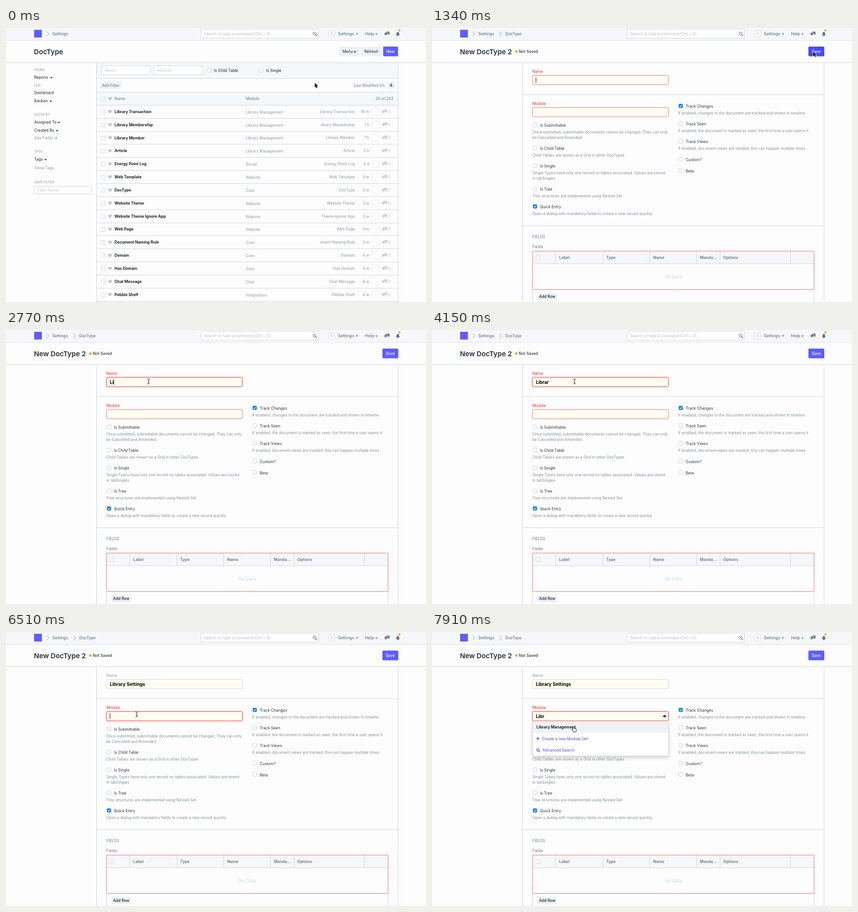
An HTML page with a canvas for the animation above (8000 ms loop, 925 by 605 pixels).

```html
<!DOCTYPE html>
<html lang="en">
<head>
<meta charset="utf-8">
<title>New DocType</title>
<style>
html, body { margin: 0; width: 100%; height: 100%; overflow: hidden; background: #fdfdfd; }
canvas { display: block; width: 925px; height: 605px; }
</style>
</head>
<body>
<canvas id="stage"></canvas>
<script>
const W = 925, H = 605, LOOP = 8000;
const canvas = document.getElementById('stage');
const ratio = window.devicePixelRatio || 1;
canvas.width = W * ratio;
canvas.height = H * ratio;
const ctx = canvas.getContext('2d');

const DARK = '#2d363f', INK = '#1b232b', MUTED = '#8d99a6', NAV = '#6c7680', FAINT = '#c3cad1',
  LINE = '#ced4d9', PANEL = '#f5f7fa', PAGE = '#fdfdfd', BUTTON = '#edf1f4', BLUE = '#5e5eff',
  HOVER = '#3434ff', PRESSED = '#2a1cff', RED = '#ff1f2b', CREAM = '#fffdf1';

// y is the middle of the capital letters
function text(str, x, y, { color = DARK, size = 8.45, weight = 400, align = 'left' } = {}) {
  ctx.font = `${weight} ${size}px Inter, sans-serif`;
  ctx.textAlign = align;
  ctx.fillStyle = color;
  ctx.fillText(str, x, y + size * 0.364);
}

function rect(x, y, w, h, color) {
  ctx.fillStyle = color;
  ctx.fillRect(x, y, w, h);
}
const hline = (x, y, w, color = LINE) => rect(x, y, w, 1, color);
const vline = (x, y, h, color = LINE) => rect(x, y, 1, h, color);

function box(x, y, w, h, { fill, stroke, radius = 2.5, width = 1 } = {}) {
  ctx.beginPath();
  ctx.roundRect(x, y, w, h, radius);
  if (fill) { ctx.fillStyle = fill; ctx.fill(); }
  if (stroke) { ctx.strokeStyle = stroke; ctx.lineWidth = width; ctx.stroke(); }
}

function poly(points, color, width, closed) {
  ctx.beginPath();
  points.forEach(([x, y]) => ctx.lineTo(x, y));
  if (closed) ctx.closePath();
  if (width) { ctx.strokeStyle = color; ctx.lineWidth = width; ctx.stroke(); }
  else { ctx.fillStyle = color; ctx.fill(); }
}

function dot(x, y, r, color) {
  ctx.beginPath();
  ctx.arc(x, y, r, 0, Math.PI * 2);
  ctx.fillStyle = color;
  ctx.fill();
}

const caretDown = (x, y, color = INK) => poly([[x - 2.8, y - 1.3], [x + 2.8, y - 1.3], [x, y + 1.7]], color);
const chevron = x => poly([[x, 8], [x + 5, 13], [x, 18]], MUTED, 1);

function button(label, x, y, w, h, fill = BUTTON, color = INK, weight = 400) {
  box(x, y, w, h, { fill });
  if (label) text(label, x + w / 2, y + h / 2, { color, weight, size: 8.5, align: 'center' });
}

function checkbox(x, y, checked) {
  if (!checked) return box(x - 4.3, y - 4.3, 8.6, 8.6, { fill: '#fff', stroke: '#b9bfc5', width: 0.8, radius: 2 });
  box(x - 4.5, y - 4.5, 9, 9, { fill: '#0b78f5', radius: 2 });
  poly([[x - 2.2, y + 0.2], [x - 0.6, y + 2], [x + 2.3, y - 2.3]], '#fff', 1.3);
}

function heart(x, y) {
  ctx.beginPath();
  ctx.moveTo(x, y + 4);
  ctx.bezierCurveTo(x - 7, y - 1, x - 4, y - 6, x, y - 2.3);
  ctx.bezierCurveTo(x + 4, y - 6, x + 7, y - 1, x, y + 4);
  ctx.fillStyle = '#c0c7ce';
  ctx.fill();
}

function comments(x, y, color, back) {
  box(x + 3.2, y - 4.3, 8, 5.8, { fill: color, radius: 1 });
  poly([[x + 8, y + 1], [x + 10.5, y + 1], [x + 10.5, y + 3.6]], color);
  box(x, y - 2.3, 7, 5.2, { fill: color, stroke: back, width: 0.8, radius: 1 });
  poly([[x + 1.2, y + 2.5], [x + 3.8, y + 2.5], [x + 1.2, y + 4.8]], color);
}

function magnifier(x, y, r, color, width) {
  ctx.beginPath();
  ctx.arc(x, y, r, 0, Math.PI * 2);
  ctx.strokeStyle = color;
  ctx.lineWidth = width;
  ctx.stroke();
  poly([[x + r * 0.7, y + r * 0.7], [x + r * 1.75, y + r * 1.75]], color, width * 1.2);
}

function bell(x, y) {
  ctx.beginPath();
  ctx.moveTo(x - 4.3, y + 3);
  ctx.bezierCurveTo(x - 2, y + 0.5, x - 4, y - 4.3, x, y - 4.3);
  ctx.bezierCurveTo(x + 4, y - 4.3, x + 2, y + 0.5, x + 4.3, y + 3);
  ctx.fillStyle = NAV;
  ctx.fill();
  dot(x, y + 3.8, 1.4, NAV);
}

function header(isForm, title) {
  rect(0, 0, W, 27, PANEL);
  hline(0, 27, W, '#dde2e6');
  box(62, 4, 17, 17, { fill: BLUE, radius: 0 });
  const nav = { color: NAV, size: 8.9, weight: 500 };
  chevron(89.5);
  text('Settings', 102, 13, nav);
  if (isForm) {
    chevron(148.5);
    text('DocType', 161.5, 13, { ...nav, size: 8.6 });
  }
  box(429.5, 2.5, 259, 20, { fill: '#fff', stroke: LINE });
  text('Search or type a command (Ctrl + G)', 436, 13, { color: '#b4bcc4' });
  magnifier(679.5, 12.2, 3.3, '#59636d', 1);
  box(711, 6.3, 13, 13.4, { fill: '#fff', stroke: '#d3d9de' });
  text('A', 717.5, 13, { color: '#b5bec7', align: 'center' });
  text('Settings', 731, 13, { ...nav, size: 9.15 });
  caretDown(773, 13, NAV);
  text('Help', 790.5, 13, { ...nav, size: 9.15 });
  caretDown(816, 13.5, NAV);
  comments(833.5, 12.3, NAV, PANEL);
  bell(863, 13);
  dot(866.5, 5.3, 2.4, '#ffa00a');
  hline(0, 76, W);
  text(title, 61.5, 52, { size: 15.2, weight: 600, color: '#262f38' });
}

function sidebar() {
  const heading = (s, y) => text(s, 62, y, { color: MUTED, size: 7.2 });
  const menu = (s, y, caretX) => { text(s, 62, y, { color: INK }); if (caretX) caretDown(caretX, y + 0.8); };
  const link = (s, y) => text(s, 62, y, { color: MUTED });
  heading('VIEWS', 92);
  menu('Reports', 109, 100);
  link('List', 126);
  menu('Dashboard', 143);
  menu('Kanban', 161, 98.5);
  heading('FILTER BY', 191);
  menu('Assigned To', 208, 116.5);
  menu('Created By', 226, 112.5);
  link('Add Fields', 243);
  poly([[107, 243], [114, 243]], MUTED, 1);
  poly([[110.5, 239.5], [110.5, 246.5]], MUTED, 1);
  heading('TAGS', 272.5);
  menu('Tags', 290, 87);
  link('Show Tags', 309);
  heading('SAVE FILTER', 340.5);
  box(62.5, 349.5, 125.5, 17, { fill: '#fff', stroke: LINE });
  text('Filter Name', 69.5, 358, { color: FAINT, size: 8.6 });
}

const LM = 'Library Management';
const ROWS = [
  ['Library Transaction', LM, '19 m'], ['Library Membership', LM, '1 h'], ['Library Member', LM, '1 h'],
  ['Article', LM, '2 h'], ['Energy Point Log', 'Social', '4 d'], ['Web Template', 'Website', '3 w'],
  ['DocType', 'Core', '3 w'], ['Website Theme', 'Website', '3 w'], ['Website Theme Ignore App', 'Website', '3 w'],
  ['Web Page', 'Website', '3 w'], ['Document Naming Rule', 'Core', '3 w'], ['Domain', 'Core', '4 w'],
  ['Has Domain', 'Core', '4 w'], ['Chat Message', 'Chat', '4 w'], ['Pebble Shelf', 'Integrations', '4 w']
];

function listRow([name, module, age], i) {
  const y = 184.7 + i * 28.85;
  const muted = { color: MUTED };
  checkbox(214.7, y + 0.6);
  heart(229.2, y);
  text(name, 239, y, { color: INK, size: 8.55, weight: 700 });
  text(module, 528, y + 1, muted);
  ctx.save();
  ctx.beginPath();
  ctx.rect(692, y - 10, 80, 20);
  ctx.clip();
  text(name, 768.5, y, { ...muted, align: 'right' });
  ctx.restore();
  text(age, 800, y, { ...muted, align: 'right' });
  ctx.setLineDash([2, 1.5]);
  box(806, y - 8.2, 16, 16, { stroke: '#d3d9de', width: 0.8 });
  ctx.setLineDash([]);
  comments(828, y - 0.5, '#c6cdd4', PAGE);
  text('0', 841, y, { color: '#b9c1c9' });
  hline(200, Math.round(y + 14), 663);
}

function listPage(newColor) {
  header(false, 'DocType');
  button('', 734, 41, 44.5, 21.5);
  text('Menu', 741, 52, { color: INK, size: 8.5 });
  caretDown(768.5, 52.5);
  button('Refresh', 782, 41, 45.5, 21.5);
  button('New', 830.5, 41, 33, 21.5, newColor, '#fff', 500);
  sidebar();

  rect(200, 77, 663, 34, PANEL);
  [['Name', 210.5], ['Module', 326]].forEach(([s, x]) => {
    box(x, 83.5, 107.5, 20, { fill: '#fff', stroke: LINE });
    text(s, x + 7.5, 94, { color: FAINT, size: 8.7 });
  });
  [['Is Child Table', 447], ['Is Single', 562]].forEach(([s, x]) => {
    checkbox(x, 93.5);
    text(s, x + 10.7, 94.3, { color: INK });
  });
  hline(200, 111, 663);
  button('', 207, 119, 46.5, 15.5);
  text('Add Filter', 211, 127, { color: NAV });
  text('Last Modified On', 766, 127, { color: NAV });
  button('', 840.5, 119, 15.5, 15.5);
  rect(847, 122.5, 2.6, 4, NAV);
  poly([[844.3, 126], [852.3, 126], [848.3, 130.5]], NAV);
  hline(200, 141, 663);
  rect(200, 142, 663, 28, PANEL);
  checkbox(214.7, 156.5);
  heart(229.2, 156);
  text('Name', 239, 156.3, { color: NAV });
  text('Module', 528, 156.3, { color: NAV });
  text('20 of 243', 853, 156.3, { color: NAV, align: 'right' });
  hline(200, 170, 663);
  ROWS.forEach(listRow);
  vline(199, 77, 528);
  vline(863, 77, 528);
}

function field(label, y, { value, invalid, focused, caret }) {
  text(label, 221, y - 19.5, { color: invalid ? RED : MUTED });
  const shape = [221.2, y - 10.3, 299.4, 20.4];
  if (focused) box(...shape, { stroke: 'rgba(255,40,40,.25)', width: 2.8, radius: 3 });
  box(...shape, { fill: CREAM, radius: 3, stroke: focused ? '#f8423a' : invalid ? '#ee6b6b' : LINE });
  text(value, 228.7, y, { color: '#000', size: 10, weight: 700 });
  if (caret) rect(228.5 + ctx.measureText(value).width, y - 6, 1, 12, '#000');
}

function option(x, y, label, help = [], checked = false) {
  checkbox(x + 5.8, y - 0.9, checked);
  text(label, x + 16.7, y, { color: DARK, size: 8.5 });
  help.forEach((s, i) => text(s, x, y + 15 + i * 12, { color: '#84909c', size: 8.35 }));
}

function formPage(saveColor) {
  header(true, 'New DocType 2');
  dot(185.7, 52, 2.7, '#ffa00a');
  text('Not Saved', 191, 52, { size: 8.6, weight: 500 });
  button('Save', 829, 41, 35, 21.5, saveColor, '#fff', 500);
  vline(199, 77, 528);
  vline(863, 77, 528);
  hline(200, 147, 663);
  hline(200, 436, 663);

  option(221, 215, 'Is Submittable', ['Once submitted, submittable documents cannot be changed. They can only', 'be Cancelled and Amended.']);
  option(221, 266, 'Is Child Table', ['Child Tables are shown as a Grid in other DocTypes']);
  option(221, 305, 'Is Single', ['Single Types have only one record no tables associated. Values are stored', 'in tabSingles']);
  option(221, 356, 'Is Tree', ['Tree structures are implemented using Nested Set']);
  option(221, 395, 'Quick Entry', ['Open a dialog with mandatory fields to create a new record quickly'], true);
  option(542, 173, 'Track Changes', ['If enabled, changes to the document are tracked and shown in timeline'], true);
  option(542, 212, 'Track Seen', ['If enabled, the document is marked as seen, the first time a user opens it']);
  option(542, 251, 'Track Views', ['If enabled, document views are tracked, this can happen multiple times']);
  option(542, 290.5, 'Custom?');
  option(542, 315.5, 'Beta');

  text('FIELDS', 221, 460.5, { color: NAV, size: 8.3 });
  text('Fields', 221, 483, { color: NAV });
  rect(221, 493, 620, 27, PANEL);
  hline(221, 520, 620);
  [272, 376, 479, 582, 634, 789].forEach(x => vline(x, 493, 27));
  checkbox(233.3, 507);
  [['Label', 280], ['Type', 383.5], ['Name', 487], ['Manda...', 590], ['Options', 641.5]]
    .forEach(([s, x]) => text(s, x, 506.5, { color: NAV, size: 8.7, weight: 600 }));
  text('No Data', 531.5, 549.5, { color: '#d1d8dd', size: 9.8, align: 'center' });
  vline(221, 578, 27);
  vline(841, 578, 27);
  box(221.5, 492.5, 620, 85, { stroke: '#f26b6b', radius: 1.5 });
  button('Add Row', 232, 585, 43.5, 16, BUTTON, INK, 500);
}

function dropdown() {
  const link = { color: '#4b47f5' };
  ctx.save();
  ctx.shadowColor = 'rgba(0,0,0,.22)';
  ctx.shadowBlur = 8 * ratio;
  ctx.shadowOffsetY = 3 * ratio;
  box(221.5, 197, 299, 76.5, { fill: '#fff' });
  ctx.restore();
  box(221.5, 197, 299, 76.5, { stroke: LINE, width: 0.7 });
  rect(222, 198, 298, 24.5, '#eff2f5');
  text(LM, 230, 210.3, { color: INK, size: 8.55, weight: 700 });
  poly([[230, 235.3], [236.5, 235.3]], link.color, 1.6);
  poly([[233.2, 232], [233.2, 238.6]], link.color, 1.6);
  text('Create a new Module Def', 242.3, 235.5, link);
  magnifier(233.2, 260.5, 2.6, link.color, 1.2);
  text('Advanced Search', 243.5, 261, link);
}

function pointer(kind, x, y) {
  ctx.save();
  ctx.translate(x, y);
  ctx.lineJoin = 'round';
  if (kind === 'arrow') {
    const shape = [[0, 0], [0, 10.5], [2.4, 8.3], [4, 12], [5.8, 11.2], [4.2, 7.6], [7.4, 7.6]];
    poly(shape, '#fff', 1.6, true);
    poly(shape, '#000');
  } else if (kind === 'beam') {
    poly([[0, -4.5], [0, 4.5]], '#222', 1.1);
    [-1, 1].forEach(s => poly([[-2.8, s * 5.5], [-1, s * 5.3], [0, s * 4.3], [1, s * 5.3], [2.8, s * 5.5]], '#222', 1));
    poly([[-1.4, 1.8], [1.4, 1.8]], '#222', 0.9);
  } else {
    const hand = [[-2.6, -6], [-1.2, -6.6], [0, -5.7], [0.2, -2], [2, -2.2], [4.6, -1], [5, 1.4], [3.6, 5.8],
      [-1.2, 5.8], [-4.6, 1], [-4.3, -0.3], [-2.4, 0.6]];
    poly(hand, '#fff', 0, true);
    poly(hand, '#111', 1, true);
  }
  ctx.restore();
}

// Pointer stops: time, x, y
const PATH = [
  [0, 680, 121], [480, 737, 107], [630, 786, 82], [750, 832, 59], [860, 850, 51], [980, 839.5, 52],
  [1580, 800, 58], [1700, 650, 85], [1810, 480, 107], [1930, 375, 113], [2050, 327, 114], [2170, 314, 113.5],
  [5840, 308, 135], [5940, 294, 168], [6040, 288, 182],
  [7580, 291, 188], [7690, 300, 202], [7800, 309, 212], [7910, 313, 215]
];
const NAME_KEYS = [2530, 2770, 3010, 3250, 3370, 3490, 4390, 4510, 4720, 4920, 5040, 5240, 5360, 5480, 5600, 5720];
const MODULE_KEYS = [6750, 6870, 6980, 7220];
const CARET_OFF = [[1930, 2410], [4150, 4390], [7800, LOOP]];

const between = (t, a, b) => t >= a && t < b;
const typed = (str, keys, t) => str.slice(0, keys.filter(k => k <= t).length);

function pointerKind(t, x, y) {
  if (t >= 7460 && y > 197) return 'hand';
  const inField = x > 221 && x < 521 && (between(y, 105, 127) || between(y, 176, 197));
  return t >= 1340 && inField ? 'beam' : 'arrow';
}

function draw(t) {
  ctx.setTransform(ratio, 0, 0, ratio, 0, 0);
  rect(0, 0, W, H, PAGE);
  if (t < 1340) {
    listPage(t >= 1220 ? PRESSED : t >= 750 ? HOVER : BLUE);
  } else {
    const caret = !CARET_OFF.some(([a, b]) => between(t, a, b));
    const inModule = t >= 6160;
    formPage(t < 1430 ? '#4a48ff' : t < 1700 ? HOVER : BLUE);
    field('Name', 115, {
      value: typed('Library Settings', NAME_KEYS, t), invalid: t < 6390,
      focused: between(t, 1430, 6160), caret: caret && !inModule
    });
    field('Module', 186, {
      value: typed('Libr', MODULE_KEYS, t), invalid: true, focused: inModule, caret: caret && inModule
    });
    if (t >= 6750) {
      rect(508.5, 184.6, 4.5, 2.6, INK);
      poly([[512, 182.2], [516, 185.9], [512, 189.6]], INK);
    }
    if (t >= 7460) dropdown();
  }
  const [, x, y] = PATH.filter(p => p[0] <= t).pop();
  pointer(pointerKind(t, x, y), x, y);
}

const start = performance.now();
function tick() {
  draw((performance.now() - start) % LOOP);
  requestAnimationFrame(tick);
}
tick();
</script>
</body>
</html>
```
